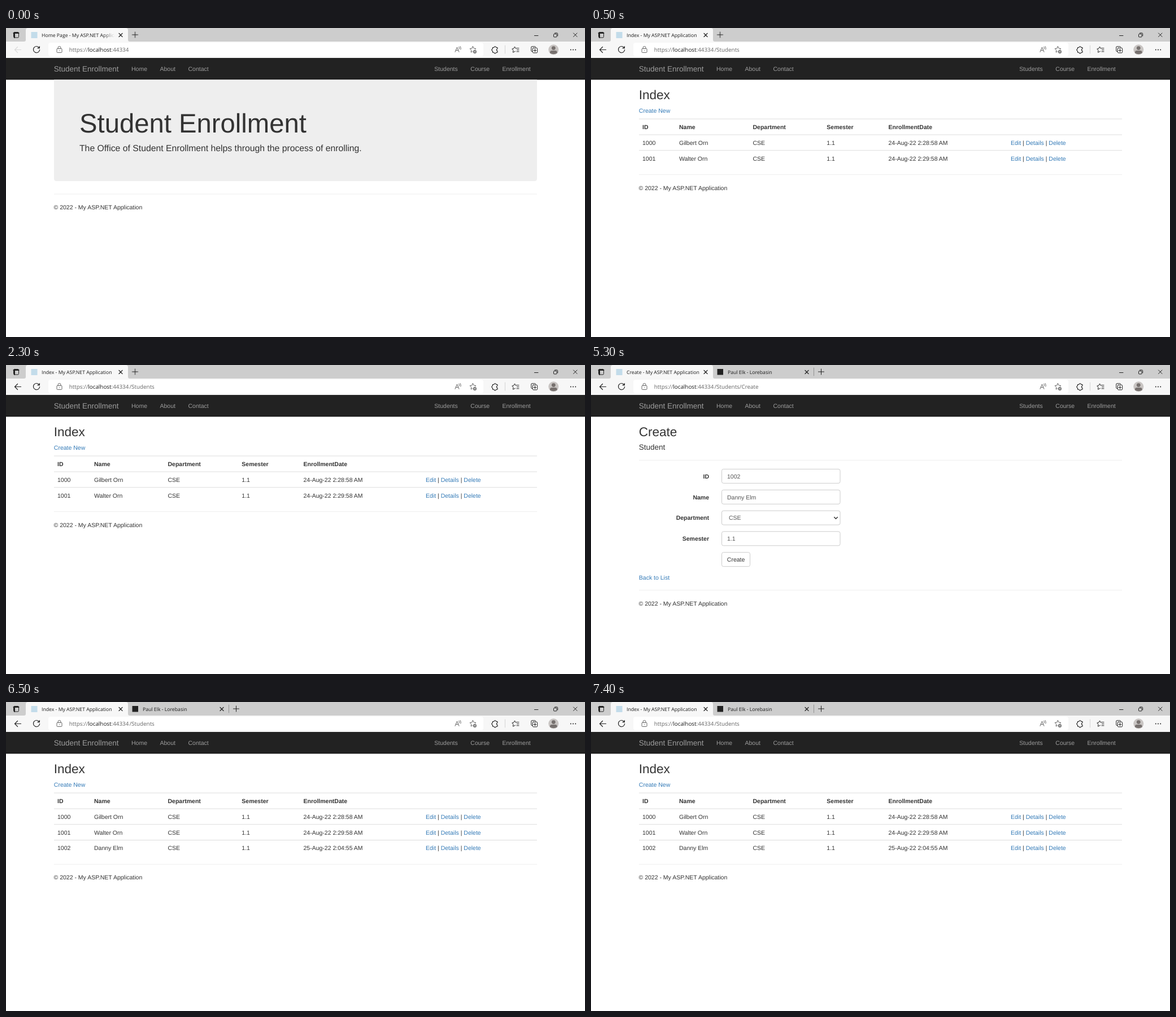
An HTML page for the animation above (8 s loop, 1025 by 547 pixels).

```html
<!DOCTYPE html>
<html lang="en">
<head>
<meta charset="utf-8">
<title>Student Enrollment</title>
<style>
html, body { margin: 0; width: 100%; height: 100%; overflow: hidden; background: #fff; }
svg { display: block; width: 100vw; height: 100vh; }
text { white-space: pre; text-rendering: geometricPrecision; }
.page { font: 10.5px "Liberation Sans", Arial, sans-serif; fill: #333; }
.tab { font: 8.7px "Open Sans", "Noto Sans", sans-serif; fill: #1b1b1b; }
.url { font: 9.85px "Open Sans", "Noto Sans", sans-serif; fill: #666; }
.url tspan { fill: #1a1a1a; }
.nav { fill: #9d9d9d; }
.brand, .h4 { font-size: 13.5px; }
.h1 { font-size: 47.25px; }
.h2 { font-size: 22.5px; }
.lead { font-size: 15.75px; }
.bold { font-weight: 700; }
.right { text-anchor: end; }
.link { fill: #337ab7; }
.value { fill: #555; }
.rule { stroke: #eee; }
.line { stroke: #ddd; }
.box { fill: #fff; stroke: #ccc; }
.icon { fill: none; stroke: #222; stroke-linecap: round; stroke-linejoin: round; }
.soft { stroke: #666; }

/* Screens: home, list, form, list with the new row */
.home, .list, .short, .form, .added, .single, .double, .back {
  opacity: 0;
  animation: 8s step-end infinite;
}
.home { animation-name: home; }
.list { animation-name: list; }
.short { animation-name: short; }
.form { animation-name: form; }
.added { animation-name: added; }
.single { animation-name: single; }
.double { animation-name: double; }
.back { animation-name: back; }
@keyframes home { 0% { opacity: 1 } 6.25%, 100% { opacity: 0 } }
@keyframes list { 0%, 43.75% { opacity: 0 } 6.25%, 81.25%, 100% { opacity: 1 } }
@keyframes short { 0%, 43.75%, 100% { opacity: 0 } 6.25% { opacity: 1 } }
@keyframes form { 0%, 81.25%, 100% { opacity: 0 } 43.75% { opacity: 1 } }
@keyframes added { 0% { opacity: 0 } 81.25%, 100% { opacity: 1 } }
@keyframes single { 0% { opacity: 1 } 43.75%, 100% { opacity: 0 } }
@keyframes double { 0% { opacity: 0 } 43.75%, 100% { opacity: 1 } }
@keyframes back { 0% { opacity: .14 } 6.25%, 100% { opacity: 1 } }
</style>
</head>
<body>
<svg viewBox="0 0 1025 547">
  <defs>
    <linearGradient id="fade">
      <stop offset="0" stop-color="#f7f7f7" stop-opacity="0"/>
      <stop offset="1" stop-color="#f7f7f7"/>
    </linearGradient>
    <path id="close" d="M-3-3 3 3M3-3-3 3"/>
    <path id="plus" d="M-5 0H5M0-5V5"/>
    <path id="star" d="M0-5.5 1.7-2 5.5-1.5 2.7 1.2 3.4 5 0 3.2-3.4 5-2.7 1.2-5.5-1.5-1.7-2Z"/>
    <g id="footer">
      <path class="rule" d="M85 0H940"/>
      <text x="84.5" y="27">© 2022 - My ASP.NET Application</text>
    </g>
    <text id="actions" x="743"><tspan class="link">Edit</tspan> | <tspan class="link">Details</tspan> | <tspan class="link">Delete</tspan></text>
  </defs>

  <!-- Browser frame -->
  <rect width="1025" height="24" fill="#cdcdcd"/>
  <rect y="24" width="1025" height="29" fill="#f7f7f7"/>
  <path d="M32 24Q35 24 35 21V4Q35 0 39 0H212Q216 0 216 4V21Q216 24 219 24Z" fill="#f7f7f7"/>
  <rect x="75" y="26" width="770" height="24" rx="4" fill="#fff"/>
  <rect x="44.5" y="7" width="11" height="11" fill="#c3dcea"/>

  <g class="icon">
    <rect x="13.5" y="7.5" width="9" height="9.5" rx="1.5"/>
    <path d="M13.5 9H22.5M15 9V17" stroke-width="2"/>
    <use href="#close" x="203" y="12.5" stroke-width="1.2"/>
    <use class="single" href="#plus" x="228.5" y="12"/>
    <g class="double">
      <use href="#close" x="382" y="12.5" stroke-width="1.2"/>
      <use href="#plus" x="407.5" y="12"/>
      <path d="M394.5 5V19" stroke="#929292"/>
    </g>
    <path d="M935.5 13.5H942"/>
    <rect x="969.5" y="10.5" width="5.5" height="5.5" rx="1"/>
    <path d="M971.5 8.8H975Q976.7 8.8 976.7 10.5V14"/>
    <path d="M1004.5 9 1011 15.5M1011 9 1004.5 15.5"/>

    <path class="back" d="M26.5 38.5H15.5M20.5 33.5 15.5 38.5 20.5 43.5" stroke-width="1.2"/>
    <path d="M58.3 34.5A5.6 5.6 0 1 0 59.6 38.5M59.3 32.5V35.7H56" stroke-width="1.2"/>
    <g class="soft">
      <rect x="90" y="36.5" width="9" height="7" rx="1.2"/>
      <path d="M92 36.5V35A2.5 2.5 0 0 1 97 35V36.5M94.5 39.8V40.2"/>
      <path d="M795 42.5 798.5 34 802 42.5M796.2 39.5H800.8M801.8 33.5Q803 35 802.4 37M804 32.5Q806 35 805 38"/>
      <use href="#star" x="826.5" y="38"/>
    </g>
    <circle cx="830" cy="42" r="3.5" fill="#555" stroke="#fff"/>
    <path d="M828.5 42H831.5M830 40.5V43.5" stroke="#fff" stroke-width=".8"/>
    <path d="M861.5 34.5H864A1.8 1.8 0 0 1 867.6 34.5H870V37A1.7 1.7 0 0 0 870 40.4V43.3H867.6A1.8 1.8 0 0 1 864 43.3H861.5V40.5A1.7 1.7 0 0 1 861.5 37Z" stroke-width="1.1"/>
    <path d="M883.5 31V45" stroke="#d4d4d4"/>
    <path d="M903.5 35.8H908M904.5 38.8H908M904 41.8H908M902.5 36.5 900.5 33 898.8 36.5 895.8 37 898 39.5 897.5 43.2 901.5 41.3"/>
    <path d="M931.5 41.5H931Q929.8 41.5 929.8 40.3V34Q929.8 32.8 931 32.8H936.5Q937.7 32.8 937.7 34"/>
    <rect x="932.3" y="35.3" width="8.4" height="8.7" rx="1.5"/>
    <path d="M934.2 39.7H938.8M936.5 37.4V42"/>
  </g>
  <circle cx="969.3" cy="38.3" r="9" fill="#c9c5c3"/>
  <circle cx="969.3" cy="35.6" r="3.4" fill="#77716f"/>
  <path d="M963 44.5V43Q963 40 966 40H972.6Q975.6 40 975.6 43V44.5Q969.3 48 963 44.5Z" fill="#77716f"/>
  <g fill="#222">
    <circle cx="999.8" cy="38.5" r="1"/><circle cx="1004" cy="38.5" r="1"/><circle cx="1008.2" cy="38.5" r="1"/>
  </g>

  <g class="tab">
    <g class="home">
      <svg x="63" width="130" height="24"><text y="15.5">Home Page - My ASP.NET Application</text></svg>
      <rect x="172" y="2" width="21" height="20" fill="url(#fade)"/>
    </g>
    <text class="list" x="63" y="15.5">Index - My ASP.NET Application</text>
    <text class="form" x="63" y="15.5">Create - My ASP.NET Application</text>
    <g class="double">
      <rect x="223.5" y="7" width="10.5" height="10.5" fill="#222"/>
      <text x="242" y="15.5">Paul Elk - Lorebasin</text>
    </g>
  </g>
  <g class="url">
    <text x="111.7" y="42">https://<tspan>localhost</tspan>:44334</text>
    <text class="list" x="218.5" y="42">/Students</text>
    <text class="form" x="218.5" y="42">/Students/Create</text>
  </g>

  <g class="page">
    <rect y="53" width="1025" height="38" fill="#222"/>
    <rect y="90.5" width="1025" height="1" fill="#080808"/>
    <g class="nav">
      <text class="brand" x="84.8" y="76.8">Student Enrollment</text>
      <text y="76"><tspan x="222">Home</tspan><tspan x="272.5">About</tspan><tspan x="322.5">Contact</tspan><tspan x="758.3">Students</tspan><tspan x="822.3">Course</tspan><tspan x="878.5">Enrollment</tspan></text>
    </g>

    <g class="home">
      <path d="M85 91.5H940V266.5Q940 271 935.5 271H89.5Q85 271 85 266.5Z" fill="#eee"/>
      <text class="h1" x="130" y="184.5">Student Enrollment</text>
      <text class="lead" x="130" y="218">The Office of Student Enrollment helps through the process of enrolling.</text>
      <use href="#footer" y="294"/>
    </g>

    <g class="list">
      <text class="h2" x="84.8" y="126">Index</text>
      <text class="link" x="84.8" y="149.7">Create New</text>
      <path class="line" d="M85 161H940M85 189H940M85 216.7H940"/>
      <text class="bold" y="179"><tspan x="91">ID</tspan><tspan x="156">Name</tspan><tspan x="286.5">Department</tspan><tspan x="417.3">Semester</tspan><tspan x="526.5">EnrollmentDate</tspan></text>
      <text y="206.8"><tspan x="91">1000</tspan><tspan x="156">Gilbert Orn</tspan><tspan x="286.5">CSE</tspan><tspan x="417.3">1.1</tspan><tspan x="526.5">24-Aug-22 2:28:58 AM</tspan></text>
      <use href="#actions" y="206.8"/>
      <text y="234.6"><tspan x="91">1001</tspan><tspan x="156">Walter Orn</tspan><tspan x="286.5">CSE</tspan><tspan x="417.3">1.1</tspan><tspan x="526.5">24-Aug-22 2:29:58 AM</tspan></text>
      <use href="#actions" y="234.6"/>
    </g>
    <use class="short" href="#footer" y="259.5"/>
    <g class="added">
      <path class="line" d="M85 244.5H940"/>
      <text y="262.4"><tspan x="91">1002</tspan><tspan x="156">Danny Elm</tspan><tspan x="286.5">CSE</tspan><tspan x="417.3">1.1</tspan><tspan x="526.5">25-Aug-22 2:04:55 AM</tspan></text>
      <use href="#actions" y="262.4"/>
      <use href="#footer" y="287.3"/>
    </g>

    <g class="form">
      <text class="h2" x="84.8" y="126">Create</text>
      <text class="h4" x="84.8" y="149.5">Student</text>
      <path class="rule" d="M85 168.5H940"/>
      <g class="bold right">
        <text x="209" y="200.7">ID</text>
        <text x="209" y="237.5">Name</text>
        <text x="209" y="274.2">Department</text>
        <text x="209" y="311">Semester</text>
      </g>
      <g class="box">
        <rect x="231.5" y="184.3" width="209.5" height="25" rx="3"/>
        <rect x="231.5" y="221.2" width="209.5" height="25" rx="3"/>
        <rect x="231.5" y="258" width="209.5" height="25" rx="3"/>
        <rect x="231.5" y="294.8" width="209.5" height="25" rx="3"/>
        <rect x="231.5" y="331.7" width="50" height="25" rx="3"/>
      </g>
      <g class="value">
        <text x="241" y="200.7">1002</text>
        <text x="241" y="237.5">Danny Elm</text>
        <text x="244" y="274.2">CSE</text>
        <text x="241" y="311">1.1</text>
      </g>
      <path d="M430.3 269 433.5 272.2 436.7 269" fill="none" stroke="#333" stroke-width="1.5"/>
      <text x="240.8" y="347.8">Create</text>
      <text class="link" x="84.8" y="379.5">Back to List</text>
      <use href="#footer" y="398.5"/>
    </g>
  </g>
</svg>
</body>
</html>
```
